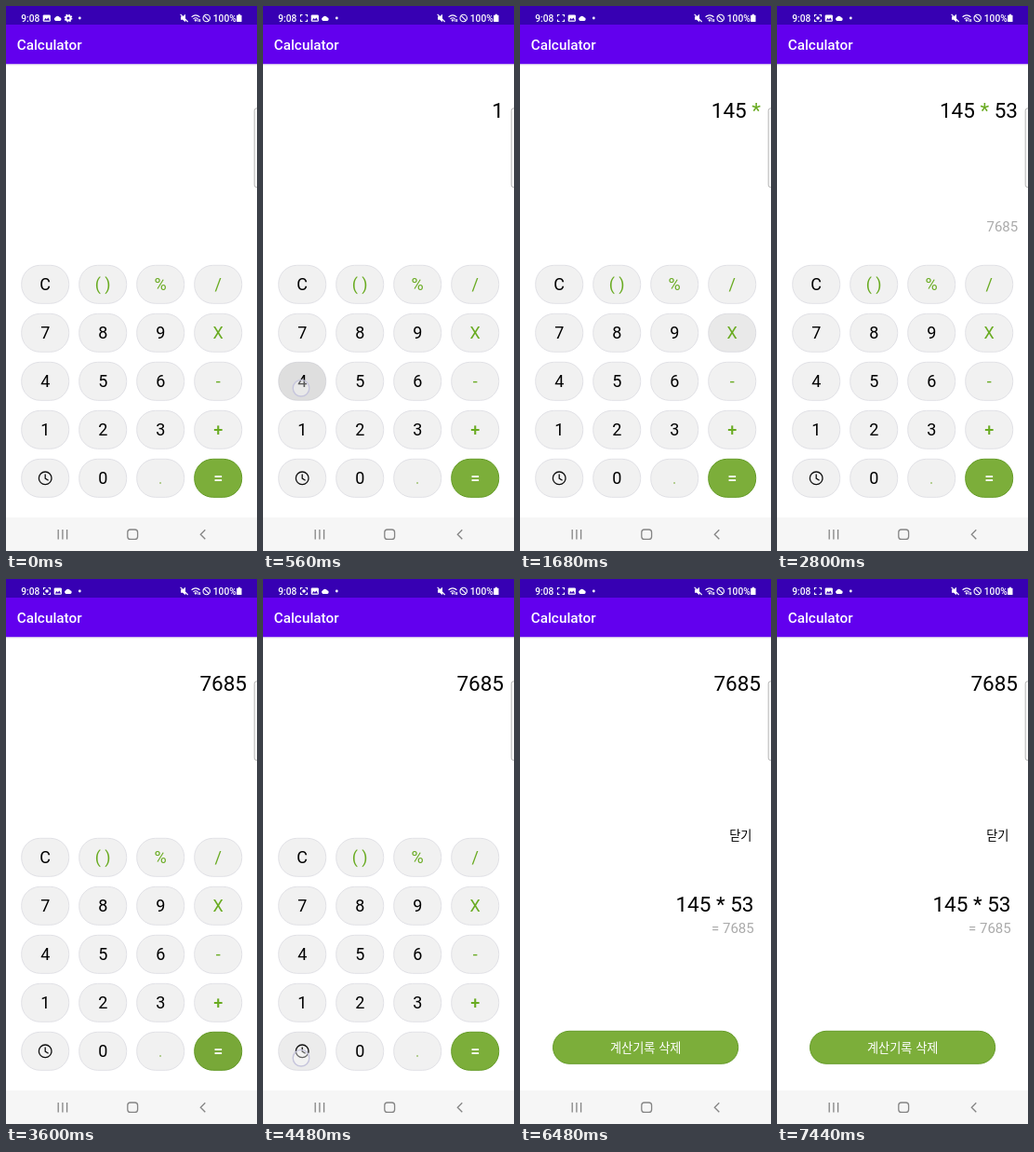
Animation, 270 px wide and 585 px high, one loop 7600 ms. Source, as an HTML page:

```html
<!DOCTYPE html>
<html lang="ko">
<head>
<meta charset="utf-8">
<title>Calculator</title>
<style>
html, body { margin: 0; width: 100%; height: 100%; overflow: hidden; background: #fff; }
svg { display: block; width: 270px; height: 585px; font-family: Roboto, "Noto Sans CJK KR", "Noto Sans CJK", sans-serif; }
text { white-space: pre; }
.right { text-anchor: end; }
.mid { text-anchor: middle; }
.big { font-size: 22.5px; }
.small { font-size: 15px; fill: #aaa; }
.ko { font-family: "Noto Sans CJK KR", "Noto Sans CJK", sans-serif; font-size: 13.2px; font-weight: 500; }
.line { fill: none; stroke: #fff; stroke-width: 1.1; }
.nav { fill: none; stroke: #858585; stroke-width: 1.3; }
</style>
</head>
<body>
<svg viewBox="0 0 270 585">
  <defs>
    <g id="image">
      <rect x=".4" y=".4" width="8.2" height="7.4" rx="1.2" fill="#fff"/>
      <path d="M1.5 6.5 3.3 4.1 4.6 5.5 6 3.5 7.8 6.5Z" fill="#3700b3"/>
    </g>
    <path id="cloud" d="M2.2 6.6A2 2 0 0 1 2 2.9 2.7 2.7 0 0 1 6.9 2.9 1.9 1.9 0 0 1 7.1 6.6Z" fill="#fff"/>
  </defs>
  <rect width="270" height="585" fill="#fff"/>
  <rect y="20" width="270" height="42.5" fill="#6200ee"/>
  <rect width="270" height="20" fill="#3700b3"/>
  <rect y="62.5" width="270" height="1" fill="#e8e8ea"/>
  <text x="11.7" y="47" font-size="15.3" font-weight="500" fill="#fff">Calculator</text>

  <g fill="#fff" font-size="10.2" font-weight="500">
    <text x="16.2" y="16.7">9:08</text>
    <text x="222.8" y="16.7">100%</text>
    <circle cx="79.3" cy="13" r="1.4"/>
    <g id="before">
      <use href="#image" x="39.3" y="9"/>
      <use href="#cloud" x="51" y="9.3"/>
      <circle cx="67" cy="13" r="2.5" class="line" style="stroke-width:2"/>
      <circle cx="67" cy="13" r="3.8" class="line" style="stroke-width:1.2;stroke-dasharray:1.5 1.48"/>
    </g>
    <g id="after">
      <path class="line" d="M40.5 11.5V9.5h2M45.5 9.5h2v2M47.5 14.5v2h-2M42.5 16.5h-2v-2"/>
      <circle id="dot" cx="44" cy="13" r="1.8"/>
      <use href="#image" x="51.3" y="9"/>
      <use href="#cloud" x="62.2" y="9.3"/>
    </g>
    <path d="M188 11.2h2l3-2.4v8.4l-3-2.4h-2Z"/>
    <path class="line" d="M187.6 8.8 195.6 17"/>
    <path class="line" d="M199.6 11.8q4.4-4 8.8 0M201.4 13.8q2.6-2.2 5.2 0"/>
    <path d="M202.3 15 204 17l1.7-2q-1.7-1.4-3.4 0ZM206.4 14h1v3h-1Zm1.7 0h1v3h-1Z"/>
    <circle class="line" cx="215.7" cy="13" r="3.7"/>
    <path class="line" d="M213.1 10.4 218.3 15.6"/>
    <path d="M249.8 8.8h2v.9h1.2q.5 0 .5.5v6.4q0 .5-.5.5h-4.4q-.5 0-.5-.5v-6.4q0-.5.5-.5h1.2Z"/>
  </g>

  <text id="expr" class="right big" x="259" y="119.6"></text>
  <text id="preview" class="right small" x="259.2" y="241.7"></text>

  <g id="pad"></g>

  <g id="history">
    <text class="ko right" x="249.4" y="280.3">닫기</text>
    <text class="right big" x="251.5" y="357.3">145 * 53</text>
    <text class="right small" x="251.7" y="380">= 7685</text>
    <rect x="35.5" y="485.3" width="199.2" height="35" rx="17.5" fill="#7cae3a" stroke="#659c28"/>
    <text class="ko mid" x="135.2" y="507.6" fill="#fff">계산기록 삭제</text>
  </g>

  <rect x="267.2" y="109.8" width="12" height="84.8" rx="2.5" fill="#fafafa" stroke="#b5b5b5"/>
  <circle id="touch" r="8.8" fill="#fff" fill-opacity=".35" stroke="#c6c5dc" stroke-width="1.4"/>

  <rect y="549" width="270" height="36" fill="#f6f6f6"/>
  <path class="nav" d="M56.2 562v10.5M60.9 562v10.5M65.6 562v10.5"/>
  <rect class="nav" x="130.8" y="562" width="10.8" height="10.4" rx="3"/>
  <path class="nav" d="M214.3 562.2 209.3 567.2 214.3 572.2"/>
</svg>
<script>
const LOOP = 7600;
const $ = id => document.getElementById(id);
const GREEN = '#69ab21';
const KEYS = ['C', '( )', '%', '/', '7', '8', '9', 'X', '4', '5', '6', '-',
              '1', '2', '3', '+', 'clock', '0', '.', '='];

// key, finger down, finger up, expression and preview afterwards
const TAPS = [
  ['1', 160, 320, '1', ''],
  ['4', 480, 640, '14', ''],
  ['5', 800, 880, '145', ''],
  ['X', 1360, 1600, '145 *', ''],
  ['5', 1840, 2000, '145 * 5', '725'],
  ['3', 2160, 2320, '145 * 53', '7685'],
  ['=', 3360, 3520, '7685', ''],
  ['clock', 4320, 4640, '7685', '']
];
const HISTORY_AT = 4720;
const ICONS_AT = 80;
const DOT_OFF = [[400, 640], [1200, 1360], [1600, 2000], [2400, 2800], [3200, 3600], [3920, 4320],
                 [4640, 5040], [5440, 5840], [6240, 6640], [6880, 7200], [7440, LOOP]];

const center = i => [42.2 + i % 4 * 62, 298.8 + Math.floor(i / 4) * 52];

function keyMarkup(label, i) {
  const [x, y] = center(i);
  const equal = label === '=';
  const box = `x="${x - 25.5}" y="${y - 20.5}" width="51" height="41" rx="20"`;
  const color = equal ? '#fff' : /[0-9C]/.test(label) ? '#000' : label === '.' ? '#a5c57c' : GREEN;
  const face = label === 'clock'
    ? `<g fill="none" stroke="#111" stroke-width="1.3"><circle cx="${x}" cy="${y}" r="6.8"/>
       <path d="M${x} ${y - 4.3}v4.6l3.4 2.1"/></g>`
    : `<text class="mid" x="${x}" y="${y + 6.5}" font-size="18" font-weight="${/[=+]/.test(label) ? 500 : 400}" fill="${color}">${label}</text>`;
  return `<rect ${box} fill="${equal ? '#7cae3a' : '#f1f1f1'}" stroke="${equal ? '#659c28' : '#e1e1e6'}"/>
    <rect class="ripple" ${box} fill="#000" opacity="0"/>${face}`;
}

$('pad').innerHTML = KEYS.map(keyMarkup).join('');
const ripples = [...document.querySelectorAll('.ripple')];
const show = (id, on) => $(id).setAttribute('visibility', on ? 'visible' : 'hidden');

function pressure(t, down, up) {
  if (t < down) return 0;
  if (t < up) return Math.min(1, (t - down + 40) / 120);
  return Math.max(0, 1 - (t - up) / 150);
}

let shown;
function setText(expr, preview) {
  if (shown === expr + '|' + preview) return;
  shown = expr + '|' + preview;
  $('expr').innerHTML = expr.replace('*', `<tspan fill="${GREEN}">*</tspan>`);
  $('preview').textContent = preview;
}

function draw(t) {
  let expr = '', preview = '', finger = null;
  const press = KEYS.map(() => 0);
  for (const [key, down, up, e, p] of TAPS) {
    const i = KEYS.indexOf(key);
    press[i] = Math.max(press[i], pressure(t, down, up));
    if (t >= down && t < up) finger = center(i);
    if (t >= up) [expr, preview] = [e, p];
  }
  ripples.forEach((r, i) => r.setAttribute('opacity', press[i] * (KEYS[i] === 'clock' ? .02 : .08)));
  setText(expr, preview);

  show('touch', finger);
  if (finger) $('touch').setAttribute('transform', `translate(${finger[0] - 1.2} ${finger[1] + 7.4})`);
  show('pad', t < HISTORY_AT);
  show('history', t >= HISTORY_AT);
  show('before', t < ICONS_AT);
  show('after', t >= ICONS_AT);
  show('dot', t >= ICONS_AT && !DOT_OFF.some(([a, b]) => t >= a && t < b));
}

const start = performance.now();
function tick() {
  draw((performance.now() - start) % LOOP);
  requestAnimationFrame(tick);
}
tick();
</script>
</body>
</html>
```
